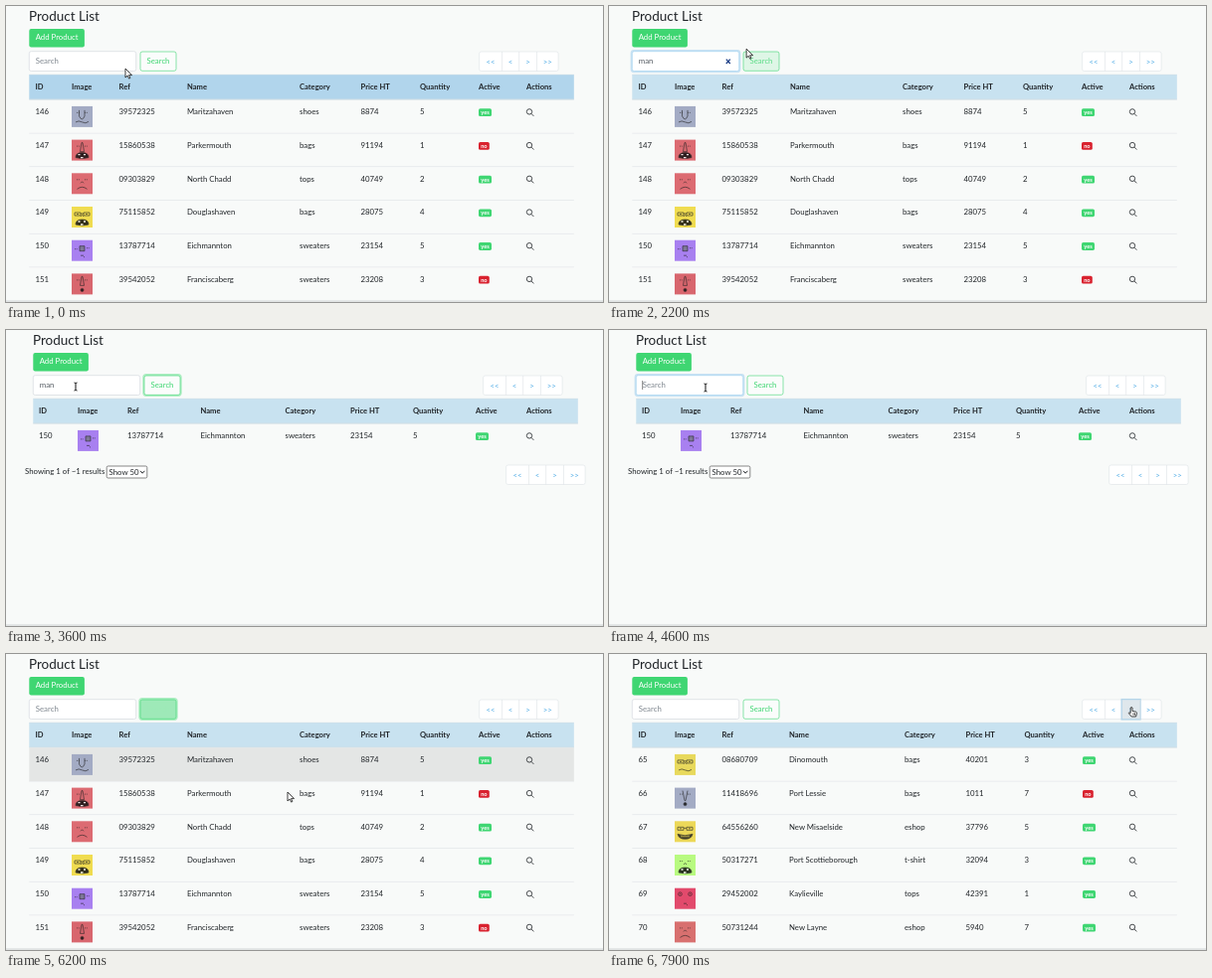
An HTML page that plays this animation: 600x298 px, repeating every 8 s.

```html
<!DOCTYPE html>
<html lang="en">
<head>
<meta charset="utf-8">
<title>Product List</title>
<style>
html, body { margin: 0; width: 100%; height: 100%; overflow: hidden; background: #f8faf9; }
svg { display: block; width: 100%; height: 100%; }
text { font: 7.8px Lato, "Open Sans", sans-serif; fill: #212529; white-space: pre; }
.title { font-size: 13.5px; }
.b { font-weight: 700; font-size: 7.6px; }
.badge { font-weight: 700; font-size: 5.7px; fill: #fff; }
.link { fill: #55aee6; text-anchor: middle; }
.mid { text-anchor: middle; }
</style>
</head>
<body>
<svg id="stage" viewBox="0 0 600 298"></svg>
<script>
const LOOP = 8000, GREEN = '#3fd672', INK = '#212529', LINE = '#dee2e6';
const stage = document.getElementById('stage');

const heads = ['ID', 'Image', 'Ref', 'Name', 'Category', 'Price HT', 'Quantity', 'Active', 'Actions'];

// id|ref|name|category|price|quantity|active|colour|eyes|nose|mouth
const parse = list => list.map(row => row.split('|'));
const first = parse([
  '146|39572325|Maritzahaven|shoes|8874|5|yes|#a3abc4|dots|u|flat',
  '147|15860538|Parkermouth|bags|91194|1|no|#dc6b72|dots|a|teeth',
  '148|09303829|North Chadd|tops|40749|2|yes|#dc6b72|dots|s|frown',
  '149|75115852|Douglashaven|bags|28075|4|yes|#f0dc50|specs|s|teeth',
  '150|13787714|Eichmannton|sweaters|23154|5|yes|#a880f0|square|none|small',
  '151|39542052|Franciscaberg|sweaters|23208|3|no|#d8666e|dots|a|drop'
]);
const second = parse([
  '65|08680709|Dinomouth|bags|40201|3|yes|#e8d95c|specs|s|flat',
  '66|11418696|Port Lessie|bags|1011|7|no|#a3abc4|dots|v|drop',
  '67|64556260|New Misaelside|eshop|37796|5|yes|#ecd858|specs|none|grin',
  '68|50317271|Port Scottieborough|t-shirt|32094|3|yes|#b8fa80|dots|s|teeth',
  '69|29452002|Kaylieville|tops|42391|1|yes|#e24a6c|wide|none|small',
  '70|50731244|New Layne|eshop|5940|7|yes|#d8706f|dots|s|frown'
]);

const views = {
  first: { rows: first, dx: 0, cols: [29.5, 66, 113.5, 182, 295, 356.5, 416, 475, 523] },
  found: { rows: [first[4]], dx: 4, cols: [33, 72, 122, 195.5, 280.5, 346, 409, 472, 523] },
  second: { rows: second, dx: 0, cols: [29.5, 66, 113.5, 181, 297, 358.5, 417.5, 476, 523] }
};

const parts = {
  dots: '<path d="M5 6.5h3M13 6.5h3" stroke-dasharray="1 .8"/>',
  specs: '<path d="M3 6h6v3H3zM12 6h6v3h-6zM9 7h3M5 7.5h2M14 7.5h2"/>',
  square: '<path d="M8 6h5v5H8z" fill="#778"/><path d="M3 9h3M15 8h3" stroke-dasharray="1 .7"/>',
  wide: '<circle cx="5.5" cy="6" r="1.8"/><circle cx="15.5" cy="6" r="1.8"/><path d="M5 6h1M15 6h1"/>',
  u: '<path d="M7.5 4v6q3 6 5.5 0V4"/>',
  a: '<path d="M8.5 12l1.5-9h1l1.5 9z"/>',
  v: '<path d="M8 3l2 10h1l2-10"/>',
  s: '<path d="M9 10q1.5-3 3 0"/>',
  none: '',
  flat: '<path d="M4 16q3-2 6.5 0t6.5-.5"/>',
  frown: '<path d="M5.5 16q5-4 10 0"/>',
  teeth: '<path d="M4 18q0-5 6.500-5T17 18q-6 2-13 0z" fill="#111"/><path d="M6.500 15h2M12 15h2M9 18h2.500" stroke="#fff" stroke-width="1.400"/>',
  small: '<path d="M9 15.500h3M12 17h1"/>',
  drop: '<circle cx="10.500" cy="16.500" r="1.500" fill="#111"/>',
  grin: '<path d="M3 13q7 3 15 0-1 5-7.500 5T3 13z" fill="#222"/><path d="M6 15.500h9" stroke="#ecd858"/>'
};

// time, x, y of the pointer tip
const track = [
  [-100, 120, 75], [0, 120, 63], [100, 120, 63], [600, 72, 57], [1900, 75, 57], [2080, 137, 43],
  [2200, 138, 43], [2300, 150, 56], [2450, 150, 56], [2700, 243, 55], [2900, 300, 62],
  [3100, 300, 62], [3600, 70, 57], [4100, 70, 57], [4250, 122, 57], [4400, 122, 57],
  [4600, 97, 58], [4750, 97, 58], [5100, 200, 58], [5300, 155, 57], [5600, 158, 57],
  [5700, 178, 57], [5800, 179, 57], [6200, 283, 139], [6500, 283, 139], [7050, 525, 54], [8000, 525, 54]
];

const ramp = (t, a, b) => Math.min(1, Math.max(0, (t - a) / (b - a)));
const within = (t, a, b) => t >= a && t < b;
const mix = (a, b, k) => `color-mix(in srgb, ${b} ${k * 100}%, ${a})`;
const text = (x, y, s, cls = '', fill = '') =>
  `<text x="${x}" y="${y}" class="${cls}" ${fill && `style="fill:${fill}"`}>${s.replace(/</g, '&lt;')}</text>`;
const box = (x, y, w, h, fill, r = 0, extra = '') =>
  `<rect x="${x}" y="${y}" width="${w}" height="${h}" rx="${r}" fill="${fill}" ${extra}/>`;
const edge = (c, w = .6) => `stroke="${c}" stroke-width="${w}"`;

function pointerAt(t) {
  const i = Math.max(1, track.findIndex(k => k[0] >= t));
  const [a, x, y] = track[i - 1], [b, u, v] = track[i];
  const k = ramp(t, a, b);
  return [x + (u - x) * k, y + (v - y) * k];
}

function pager(x, y, focus) {
  const stops = [0, 22.8, 40.2, 57.8, 79.5];
  let out = box(x, y, 79.5, 19.5, '#fff', 2, edge(LINE));
  ['<<', '<', '>', '>>'].forEach((s, i) => {
    const l = x + stops[i], w = stops[i + 1] - stops[i];
    if (i == 2 && focus) out += box(l - .6, y - .4, w + 1.2, 20.3, '#dfe7ec', 0, edge('#b5d5e9', 1.4));
    else if (i) out += box(l - .3, y, .6, 19.5, LINE);
    out += text(l + w / 2, y + 12.8, s, 'link');
  });
  return out;
}

function face(x, y, [colour, ...features]) {
  return `<g transform="translate(${x} ${y})">${box(0, 0, 21, 21, colour)}` +
    `<g fill="none" ${edge('#222', .7)} opacity=".85">${features.map(f => parts[f]).join('')}</g></g>`;
}

function table({ rows, dx, cols }, hoverY) {
  const left = 23.3 + dx, w = 547.5, pitch = 33.7;
  let out = box(left, 69, w, 25.2, within(hoverY, 69, 94) ? '#b1d5ec' : '#c8e2f0') +
    box(left, 68.8, w, .6, '#d3dfe6') + box(left, 93.6, w, .9, '#d3dde3');
  heads.forEach((s, i) => out += text(cols[i], 84, s, 'b'));
  rows.forEach(([id, ref, name, cat, price, qty, active, ...look], i) => {
    const y = 94.4 + i * pitch, base = y + 14.8;
    if (within(hoverY, y, y + pitch)) out += box(left, y, w, pitch, '#e4e6e5');
    if (i) out += box(left, y - .3, w, .6, LINE);
    [id, '', ref, name, cat, price, qty].forEach((s, c) => out += text(cols[c], base, s));
    const yes = active == 'yes', bw = yes ? 13 : 10.8;
    out += face(cols[1], y + 6.5, look) +
      box(cols[7], y + 8.9, bw, 7.8, yes ? GREEN : '#d9222f', 1.6) +
      text(cols[7] + bw / 2, y + 14.7, active, 'badge mid') +
      `<g fill="none" ${edge(INK, .8)}><circle cx="526" cy="${y + 12}" r="2.700"/><path d="M528 ${y + 14}l2.400 2.500"/></g>`;
  });
  return out;
}

function searchBar(t, dx) {
  const x = 23.3 + dx;
  const value = t < 4300 ? 'man'.slice(0, (t >= 1000) + (t >= 1200) + (t >= 1500)) : '';
  const focus = within(t, 700, 2400) || within(t, 3700, 5450);
  const lastInput = [700, 1000, 1200, 1500, 3700, 4300].filter(e => e <= t).pop();
  let out = focus ? box(x - .8, 44.9, 109, 21.4, 'none', 2.5, edge('#c9e2f3', 1.8)) : '';
  out += box(x, 45.7, 107.4, 19.8, '#fff', 2, edge(focus ? '#94cbee' : '#ced4da')) +
    text(x + 6.5, 58.2, value || 'Search', '', value ? '#565d64' : '#808890');
  if (focus && (t - lastInput) % 1000 < 500)
    out += box(x + 6.2 + value.length * 5, 51, .6, 9, '#333');
  if (focus && value)
    out += `<path d="M${x + 94.5} 53.600l4 4.400m0-4.400l-4 4.400" ${edge('#1d3f87', 1.3)}/>`;

  const hover = .15 * ramp(t, 2150, 2200) + .85 * ramp(t, 2250, 2350) - ramp(t, 2650, 2750) +
    ramp(t, 5200, 5300) - ramp(t, 6150, 6250);
  const bx = 135 + dx;
  if (within(t, 2400, 3700) || within(t, 5450, 7100))
    out += box(bx - .8, 45, 37.6, 21, 'none', 2.8, edge('#aeeec3', 1.8));
  return out + box(bx, 46, 36, 19.3, mix('#fafcfb', GREEN, hover), 2, edge(GREEN)) +
    text(bx + 18, 58.2, 'Search', 'mid', mix(GREEN, '#fff', hover));
}

function footer() {
  return text(19, 145.4, 'Showing 1 of ~1 results') +
    box(101.2, 137, 40.6, 12, '#fff', 1.5, edge('#555', .7)) + text(103.6, 145.6, 'Show 50') +
    `<path d="M135 141.800l2.200 2.400 2.200-2.400" fill="none" ${edge(INK, 1)}/>` + pager(502.6, 136, false);
}

const pointers = {
  arrow: '<path d="M0 0v9l2.100-1.900 1.500 3 1.300-.6-1.400-2.900h3z" fill="#fff"/>',
  beam: '<path d="M-1.500-4q1.500 0 1.500 1v6q0 1 1.500 1M1.500-4Q0-4 0-3M0 3q0 1-1.500 1" fill="none" stroke-width="1"/>',
  hand: '<path d="M-.8 0q.9-1 1.800 0v3.500l3.600.7q1 .3.8 1.500L4.600 9H.2L-2.800 5.500q.3-1.200 2 0z" fill="#fff"/><path d="M2 5.500v2M3.500 5.500v2"/>'
};

function pointer(t, [px, py], dx) {
  const [x, y] = pointerAt(t), bar = within(py, 45.5, 66);
  const over = (a, b) => bar && within(px - dx, a, b);
  const kind = over(23, 131) ? 'beam' : over(135, 171) || over(475, 555) ? 'hand' : 'arrow';
  return `<g transform="translate(${x} ${y})" ${edge('#111', .8)}>${pointers[kind]}</g>`;
}

function scene(t) {
  const view = t >= 7300 ? views.second : within(t, 2600, 6100) ? views.found : views.first;
  const { dx } = view, felt = pointerAt(t - 100); // the page reacts slightly late
  return text(23 + dx, 14.6, 'Product List', 'title') +
    box(23.3 + dx, 23, 55.6, 18.6, GREEN, 2) + text(51.1 + dx, 34.3, 'Add Product', 'mid', '#fff') +
    searchBar(t, dx) + pager(475.6 + dx, 46, t >= 7100) + table(view, felt[1]) +
    (view == views.found ? footer() : '') +
    box(0, 296.2, 600, 1.8, '#e1e4e4') + pointer(t, felt, dx);
}

function tick(now) {
  stage.innerHTML = scene(now % LOOP);
  requestAnimationFrame(tick);
}
tick(0);
</script>
</body>
</html>
```
